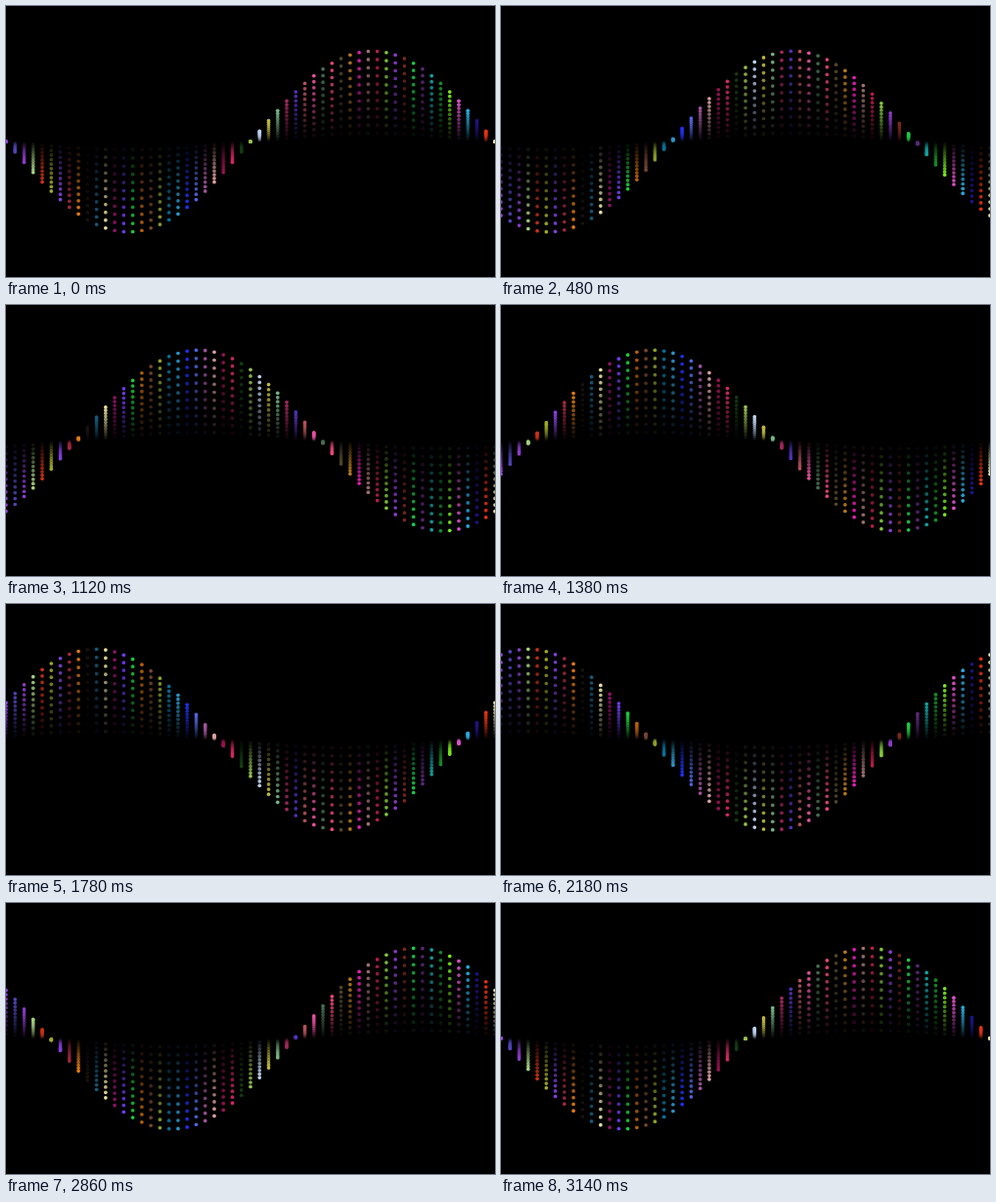
Animation of 500 by 278 pixels, one loop 3160 ms. Source, as an HTML page with a canvas:

```html
<!DOCTYPE html>
<html>
<head>
<meta charset="utf-8">
<style>
html, body { margin: 0; width: 100%; height: 100%; overflow: hidden; background: #000; }
canvas { display: block; }
</style>
</head>
<body>
<canvas id="stage" width="500" height="278"></canvas>
<script>
const W = 500, H = 278, LOOP = 3160, STEP = 20, DOTS = 11, RADIUS = 1.85;
const ctx = document.getElementById('stage').getContext('2d');

// One colour per column, left to right
const colors = `a03cf0 5044b8 8c3cc8 a5d080 c83214 a0aa28 8240d8 a02840 e07a14 18120e 145a78
e8e0a0 8c1464 6e3ce8 1ec83c b45f0a 784632 8ca028 0a6e96 2896c8 1e32f0 5064dc
a0549a dca0a0 961450 d22864 143c14 96be50 bed2f0 beb93c 78b482 a0285a 5032b4
b4505a e650a0 466e50 e64678 504628 b4781e e61eb4 a07070 b41e46 82c83c 8c3cc8
78281e 1ec846 5a2878 14a0a0 148c28 78e61e dc50c8 28aadc 1e1482 e63214 e6e6aa`.split(/\s+/);
const last = colors.length - 1;

function draw(time) {
  const phase = Math.floor(time % LOOP / STEP) * STEP / 500;
  ctx.globalAlpha = 1;
  ctx.fillStyle = '#000';
  ctx.fillRect(0, 0, W, H);
  colors.forEach((color, i) => {
    const height = H / 3 * Math.sin(2 * Math.PI * i / last + phase);
    ctx.fillStyle = '#' + color;
    // Dots brighten from the middle line out to the wave
    for (let j = 1; j <= DOTS; j++) {
      ctx.globalAlpha = j / DOTS;
      ctx.beginPath();
      ctx.arc(W * i / last, H / 2 + height * j / DOTS, RADIUS, 0, 2 * Math.PI);
      ctx.fill();
    }
  });
}

const start = performance.now();
function tick() {
  draw(performance.now() - start);
  requestAnimationFrame(tick);
}
tick();
</script>
</body>
</html>
```
